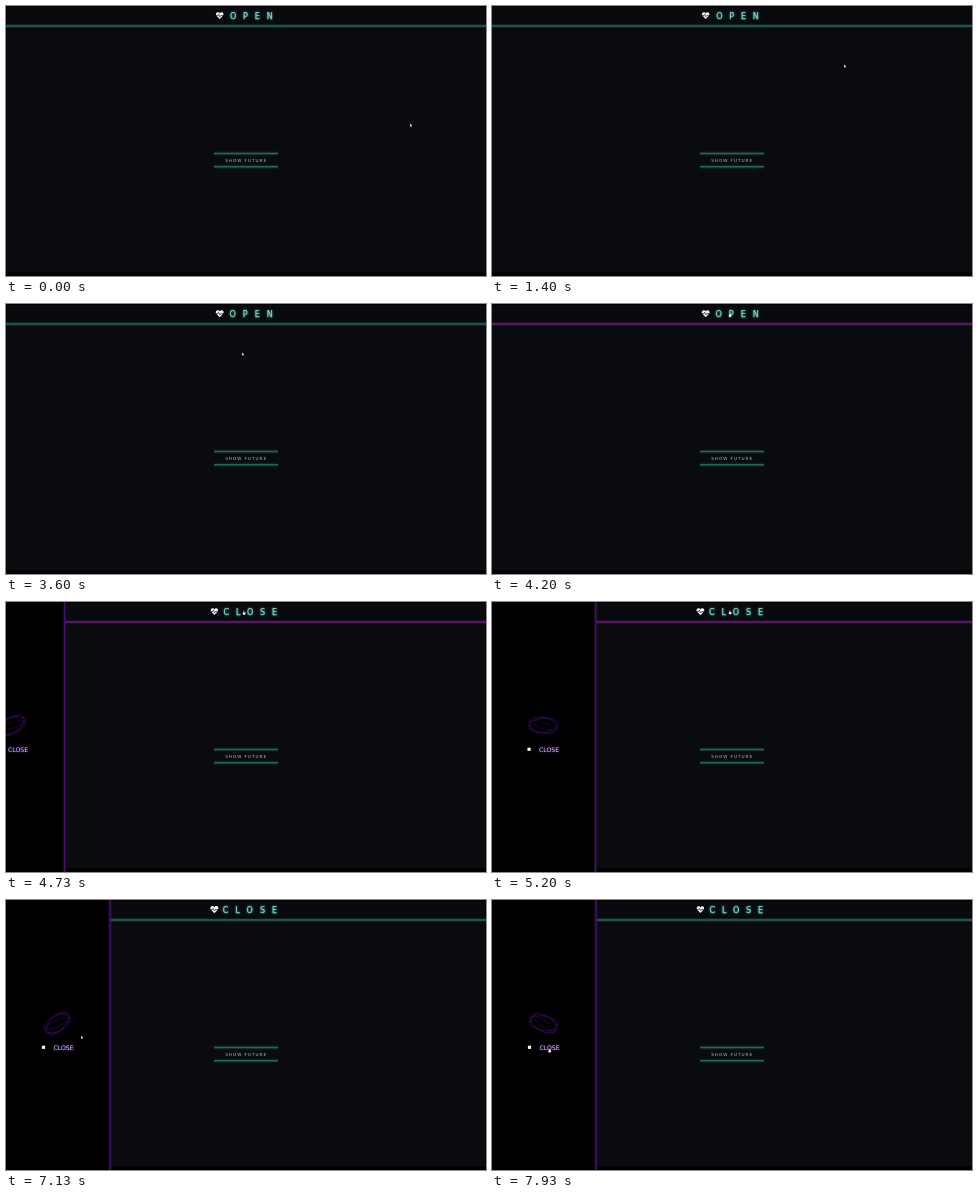
An HTML page that plays this animation: 480x270 px, repeating every 8000 ms.

```html
<!DOCTYPE html>
<html lang="en">
<head>
<meta charset="utf-8">
<style>
  html, body { margin: 0; width: 100%; height: 100%; overflow: hidden; background: #090b0f; }
  svg { display: block; width: 100vw; height: 100vh; }
  text { font-family: "DejaVu Sans", sans-serif; }
  #title { font-size: 8px; fill: #86d3c2; stroke: #86d3c2; stroke-width: .25; filter: drop-shadow(0 0 1.2px #2fae93); }
  .label { font-size: 4.2px; letter-spacing: .97px; fill: #b4bcbd; }
  .close { font-size: 6.2px; fill: #d3c5ee; filter: drop-shadow(0 0 1px #6f2bb0); }
  .glow { stroke-width: 4; opacity: .22; }
  .core { stroke-width: 1.4; }
  .teal { stroke: #22695b; }
  .violet { stroke: #48106c; }
  #ring { fill: none; stroke: #3b0b5e; stroke-width: .8; }
</style>
</head>
<body>
<svg viewBox="0 0 480 270">
  <rect width="480" height="270" fill="#090b0f"/>
  <rect width="480" height="20" fill="#080a0e"/>
  <rect width="480" height="1" fill="#000"/>
  <rect y="266.5" width="480" height="3.5" fill="#000"/>

  <g id="rule">
    <path class="glow" d="M0 20H480"/>
    <path class="core" d="M0 20H480"/>
  </g>

  <g id="heart">
    <path fill="#f2f5f5" d="M0 3.6L-3.3 .3C-4.5-1-3.7-3.3-1.9-3.3-1-3.3-.4-2.8 0-2.2.4-2.8 1-3.3 1.9-3.3 3.7-3.3 4.5-1 3.3 .3Z"/>
    <path fill="none" stroke="#090b0f" stroke-width=".65" d="M-3.9 .1H-1.8L-1-1.2 .2 1.4 1.1 .1H3.9"/>
  </g>
  <text id="title" y="12.7"></text>

  <g class="teal">
    <path class="glow" d="M208 147.5H272M208 160.7H272"/>
    <path class="core" d="M208 147.5H272M208 160.7H272"/>
  </g>
  <text class="label" x="219.2" y="156">SHOW FUTURE</text>

  <g id="sidebar">
    <rect x="-2" width="106" height="270" fill="#000"/>
    <g class="violet">
      <path class="glow" d="M104 0V270"/>
      <path class="core" d="M104 0V270"/>
    </g>
    <g id="ring">
      <ellipse rx="14.3" ry="7.8" transform="rotate(9)"/>
      <ellipse rx="14.3" ry="7.2" transform="rotate(-9)"/>
      <ellipse rx="13.5" ry="3" transform="rotate(14)" opacity=".55"/>
    </g>
    <rect x="35.9" y="145.7" width="3.2" height="3.2" fill="#f4f4f4"/>
    <text class="close" x="47.4" y="149.6">CLOSE</text>
  </g>

  <g id="cursor" fill="#f5f5f5">
    <path id="arrow" d="M-.9-1.4L1.2 .7 .3 .8 .7 1.6 .1 1.8-.3 1-.9 1.5Z"/>
    <path id="hand" d="M-.5-1.8H.2V-.5L1.5-.1V1.2L.9 2H-.8L-1.5 .4-.5 0Z"/>
  </g>
</svg>
<script>
const LOOP = 8000;
const [rule, heart, title, sidebar, ring, cursor, arrow, hand] =
  ['rule', 'heart', 'title', 'sidebar', 'ring', 'cursor', 'arrow', 'hand']
    .map(id => document.getElementById(id));

// Pointer stops: time, x, y
const stops = [
  [0, 405, 119], [80, 405, 119], [800, 354, 61], [1400, 353, 60], [1480, 352, 62],
  [1730, 321, 144], [2000, 318, 153], [2450, 319, 153], [2800, 324, 145],
  [3250, 322, 143], [3530, 242, 86], [3600, 237, 50], [3850, 238, 11],
  [6130, 238, 10], [6380, 231, 18], [6520, 231, 18], [6930, 100, 120],
  [7300, 57.5, 150.5], [LOOP, 57.5, 150.5]
];

const clamp = v => Math.min(1, Math.max(0, v));
const progress = (t, start, length) => clamp((t - start) / length);
const mix = (a, b, k) => a + (b - a) * k;
const smooth = k => k * k * (3 - 2 * k);

// The CSS "ease" curve: cubic-bezier(.25, .1, .25, 1)
function ease(x) {
  const bezier = (p1, p2, u) => 3 * p1 * u * (1 - u) ** 2 + 3 * p2 * u * u * (1 - u) + u ** 3;
  let low = 0, high = 1;
  for (let i = 0; i < 20; i++) {
    const mid = (low + high) / 2;
    if (bezier(.25, .25, mid) < x) low = mid; else high = mid;
  }
  return bezier(.1, 1, low);
}

function pointerAt(t) {
  const next = Math.max(1, stops.findIndex(s => s[0] > t));
  const [t0, x0, y0] = stops[next - 1], [t1, x1, y1] = stops[next];
  const k = smooth(progress(t, t0, t1 - t0));
  return [mix(x0, x1, k), mix(y0, y1, k)];
}

function mixColor(a, b, k) {
  return `rgb(${a.map((v, i) => Math.round(mix(v, b[i], k)))})`;
}

function draw(t) {
  const open = t >= 4400;
  const word = open ? 'CLOSE' : 'OPEN';
  const pulse = Math.cos((t - 1400) / 1667 * 2 * Math.PI);
  const shift = .5 * pulse;

  title.textContent = word;
  title.setAttribute('x', (open ? 217.1 : 223.7) + shift);
  title.style.letterSpacing = `${6.95 - shift / (word.length - 1)}px`;
  heart.setAttribute('transform', `translate(${open ? 208.4 : 213.7} 9.5) scale(${1 - .04 * pulse})`);

  const hover = progress(t, 3750, 300) - progress(t, 6580, 300);
  rule.setAttribute('stroke', mixColor([34, 105, 91], [104, 27, 116], hover));

  const slide = ease(progress(t, 4470, 800));
  sidebar.setAttribute('transform', `translate(${104 * (slide - 1)} 0)`);
  sidebar.setAttribute('visibility', slide > 0 ? 'visible' : 'hidden');
  ring.setAttribute('transform', `translate(51.5 123.3) rotate(${(t - 5150) * .072})`);

  const [x, y] = pointerAt(t);
  const pointing = y < 20 || (x < 69 && y > 143);
  cursor.setAttribute('transform', `translate(${x} ${y})`);
  arrow.setAttribute('visibility', pointing ? 'hidden' : 'visible');
  hand.setAttribute('visibility', pointing ? 'visible' : 'hidden');
}

const begin = performance.now();
function tick() {
  draw((performance.now() - begin) % LOOP);
  requestAnimationFrame(tick);
}
tick();
</script>
</body>
</html>
```
